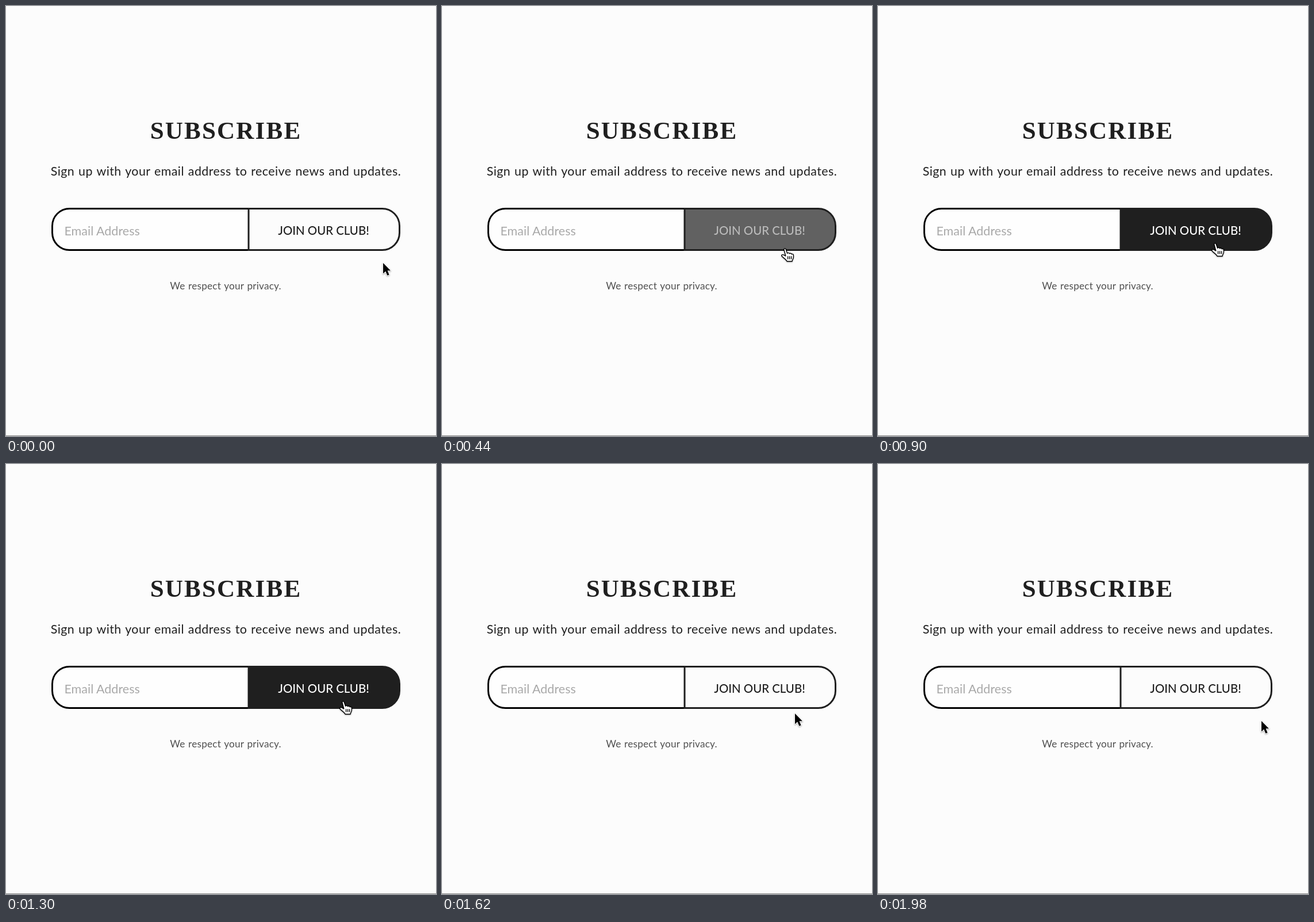
Animation, 748 px wide and 748 px high, one loop 2000 ms. Source, as an HTML page:

```html
<!DOCTYPE html>
<html lang="en">
<head>
<meta charset="utf-8">
<title>Subscribe form</title>
<style>
  html, body { margin: 0; width: 100%; height: 100%; overflow: hidden; background: #fcfcfc; }
  svg { display: block; width: 100%; height: 100%; }
  text { font-family: Lato, "Open Sans", sans-serif; fill: #1f1f1f; }
  .middle { text-anchor: middle; }
  .title { font: bold 43px "Liberation Serif", "Noto Serif", serif; letter-spacing: 2.2px; }
  .lead { font-size: 21.4px; letter-spacing: .45px; word-spacing: 1px; }
  .hint { font-size: 21.5px; fill: #a9a9a9; }
  .label { font-size: 20.4px; font-weight: 500; }
  .note { font-size: 17.2px; letter-spacing: .2px; word-spacing: 1px; fill: #505050; }
  .cursor { filter: drop-shadow(0 1.5px 1.2px rgba(0, 0, 0, .35)); stroke-linejoin: round; }
</style>
</head>
<body>
<svg viewBox="0 0 748 748">
  <rect width="748" height="748" fill="#fcfcfc"/>
  <text class="title middle" x="382.5" y="231">SUBSCRIBE</text>
  <text class="lead middle" x="382.5" y="294.5">Sign up with your email address to receive news and updates.</text>

  <path d="M422 352.5H110.5a30 30 0 0 0-30 30V394.5a30 30 0 0 0 30 30H422"
        fill="#fefefe" stroke="#000" stroke-width="3"/>
  <path id="button" d="M422 352.5H654.5a30 30 0 0 1 30 30V394.5a30 30 0 0 1-30 30H422Z"
        stroke="#1f1f1f" stroke-width="3"/>
  <text class="hint" x="101.5" y="398.5">Email Address</text>
  <text id="label" class="label middle" x="552.5" y="398.3">JOIN OUR CLUB!</text>

  <text class="note middle" x="382" y="493">We respect your privacy.</text>
  <rect y="747" width="748" height="1" fill="#858585"/>

  <g id="arrow" class="cursor">
    <path d="M0 0V18.6L4.3 14.6L7.3 21.8L10.6 20.4L7.6 13.3H13Z"
          stroke="#fff" stroke-width="2" paint-order="stroke"/>
  </g>
  <g id="hand" class="cursor" fill="#fff" stroke="#000" stroke-width="1.4">
    <path d="M-1.2 1.4C-.8-.5 1.6-.6 2.2 1.2L4.6 8.2C5.8 6.9 8 7.2 8.5 8.8C9.8 7.6 11.8 8.2 12.3 9.8
             C13.6 8.8 15.3 9.8 15.4 11.6V15C15.2 18 13.2 19.4 13 22.3H4.2C2.6 18.8-2 16.4-4.6 13.5
             C-6.2 11.2-3.8 9.6-1.8 10.9L1.8 13Z"/>
    <path d="M5.6 13.2V18.4M8.6 13.2V18.4M11.6 13.2V18.4" fill="none"/>
  </g>
</svg>
<script>
const LOOP = 2000, STEP = 20, ENTER = 370, LEAVE = 1520;

// time, then the pointer tip
const path = [
  [0, 656, 447], [120, 628, 439], [240, 610, 432], [370, 600, 426], [440, 596, 422],
  [540, 591, 417], [600, 588, 415], [720, 586, 413], [1300, 586, 413], [1420, 592, 419],
  [1520, 600, 426], [1540, 603, 428], [1620, 614, 434], [1820, 647, 446], [1980, 667, 447]
];
// time, then how far the button is filled
const fill = [[0, 0], [ENTER, 0], [ENTER + 100, 1], [LEAVE, 1], [1540, .85], [1620, 0]];

const byId = id => document.getElementById(id);
const button = byId("button"), label = byId("label"), arrow = byId("arrow"), hand = byId("hand");

function sample(keys, t) {
  const next = keys.findIndex(key => key[0] > t);
  if (next < 0) return keys.at(-1).slice(1);
  const a = keys[next - 1], b = keys[next];
  const k = (t - a[0]) / (b[0] - a[0]);
  return a.slice(1).map((value, i) => value + (b[i + 1] - value) * k);
}

const gray = (from, to, k) => {
  const v = Math.round(from + (to - from) * k);
  return `rgb(${v},${v},${v})`;
};

function draw(t) {
  const [x, y] = sample(path, t);
  const [filled] = sample(fill, t);
  const over = t >= ENTER && t < LEAVE;
  button.style.fill = gray(252, 31, filled);
  label.style.fill = gray(31, 252, filled);
  for (const cursor of [arrow, hand]) cursor.setAttribute("transform", `translate(${x} ${y})`);
  arrow.style.display = over ? "none" : "";
  hand.style.display = over ? "" : "none";
}

const start = performance.now();
function tick() {
  const t = (performance.now() - start) % LOOP;
  draw(Math.floor(t / STEP) * STEP);
  requestAnimationFrame(tick);
}
tick();
</script>
</body>
</html>
```
